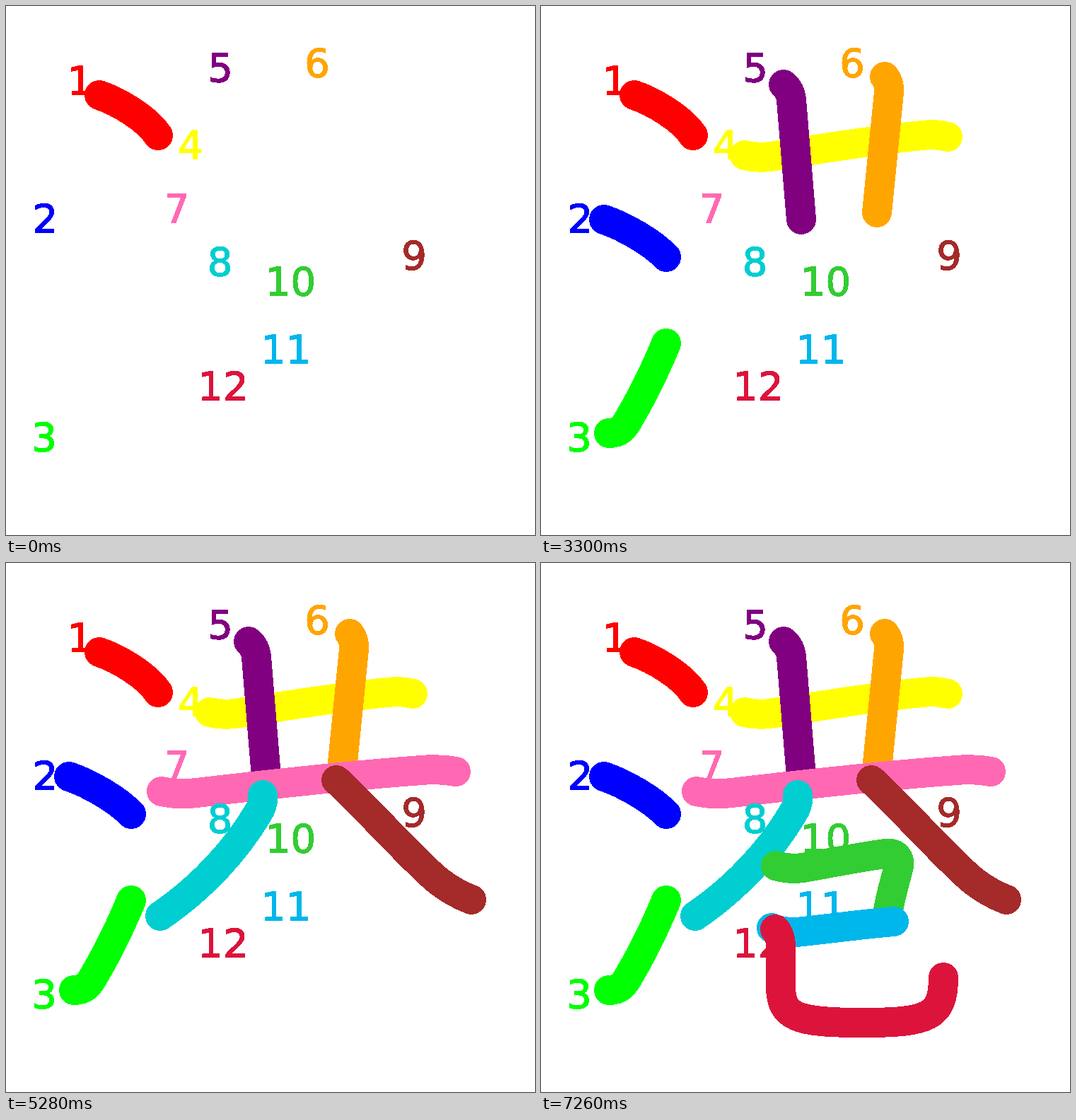
Animation of 748 by 748 pixels, one loop 7920 ms. Source, as an HTML page:

```html
<!DOCTYPE html>
<html lang="en">
<head>
<meta charset="utf-8">
<title>Stroke order</title>
<style>
  html, body { margin: 0; height: 100%; overflow: hidden; background: #fff; }
  svg { display: block; width: 100%; height: 100%; }
  path { fill: none; stroke-width: 42; stroke-linecap: round; stroke-linejoin: round; shape-rendering: crispEdges; }
  text { font: 56px Verdana, "DejaVu Sans", sans-serif; text-anchor: middle; stroke-width: 1.4; }
</style>
</head>
<body>
<svg viewBox="0 0 748 748">
  <filter id="crisp" filterUnits="userSpaceOnUse" x="0" y="0" width="748" height="748" color-interpolation-filters="sRGB">
    <feComponentTransfer><feFuncA type="discrete" tableValues="0 1"/></feComponentTransfer>
  </filter>
  <g id="strokes"></g>
  <g id="labels" filter="url(#crisp)"></g>
</svg>
<script>
const STEP = 660;

// colour, label centre x, label baseline y, path
const strokes = [
  ['#f00', 104.5, 125, 'M132 126C161 136 200 160 215 183'],
  ['#00f', 55.5, 320, 'M89 302C119 312 158 335 177 355'],
  ['#0f0', 54, 628.5, 'M96 604C113 604 118 594 123 586C141.5 555 161.5 514.5 177 477'],
  ['#ff0', 261, 216, 'M288 211C300 214 314 215 330 212C375 205 480 188 540 183C552 181.5 564 182 575 185'],
  ['purple', 303, 107, 'M343 111C349 116 353 123 354 133L368 302'],
  ['orange', 440, 100, 'M486 100C490 105 493 114 492 122L475 292'],
  ['hotpink', 241.5, 305.5, 'M220 323C235 326.5 252 327 270 325C345 316 500 299 588 293C604 291.5 620 292 636 295'],
  ['darkturquoise', 302.5, 381, 'M363 328C364 338 362 345 356 354C326 405 277 459 218 499'],
  ['brown', 577, 372, 'M467 307C490 325 580 425 612 450C626 461 640 469 658 476'],
  ['limegreen', 402.5, 408.5, 'M332 428C345 432 356 433 370 431C405 425 460 414 488 411C503 409 509 419 505 433C500 452 494 470 489 502'],
  ['#00b7eb', 396, 505, 'M326 516C340 522 352 523 366 521.5C400 518 460 510 499 507'],
  ['crimson', 307, 557, 'M331 518C336 523 339 532 339 541V598C339 642 360 650 454 650C548 650 569 642 569 586']
];

function add(parent, tag, attrs) {
  const el = document.createElementNS('http://www.w3.org/2000/svg', tag);
  for (const key in attrs) el.setAttribute(key, attrs[key]);
  return document.getElementById(parent).appendChild(el);
}

const paths = strokes.map(([color, x, y, d], i) => {
  add('labels', 'text', { x, y, fill: color, stroke: color }).textContent = i + 1;
  return add('strokes', 'path', { d, stroke: color });
});

const start = performance.now();
function draw(now) {
  const current = Math.floor(Math.max(0, now - start) / STEP) % paths.length;
  paths.forEach((path, i) => path.style.display = i <= current ? '' : 'none');
  requestAnimationFrame(draw);
}
draw(start);
</script>
</body>
</html>
```
